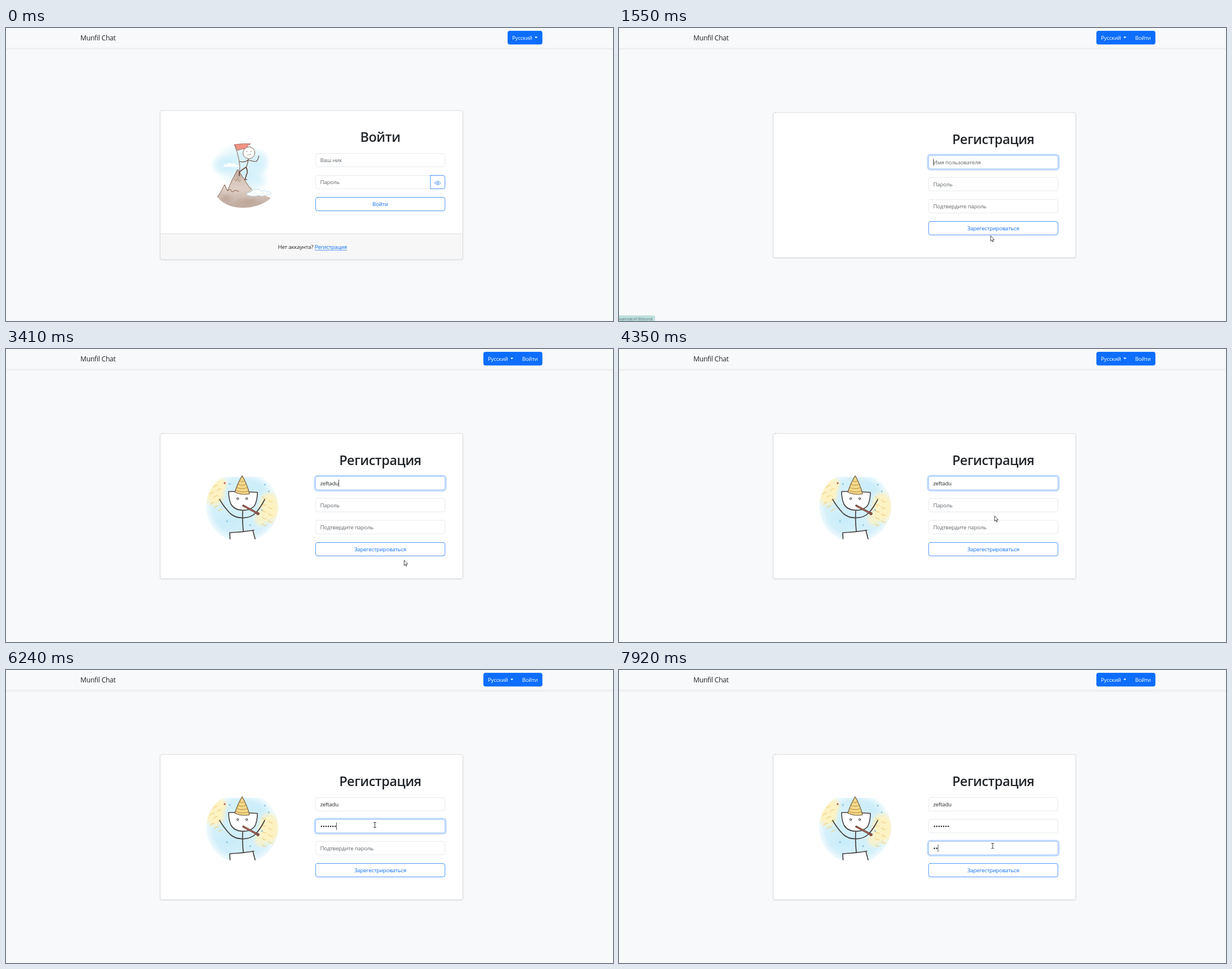
An HTML page with a canvas for the animation above (8000 ms loop, 1077 by 520 pixels).

```html
<!DOCTYPE html>
<html lang="ru">
<head>
<meta charset="utf-8">
<title>Munfil Chat</title>
<style>
html, body { margin: 0; width: 100%; height: 100%; overflow: hidden; background: #f8f9fa; }
canvas { display: block; width: 1077px; height: 520px; }
</style>
</head>
<body>
<canvas id="stage"></canvas>
<script>
const W = 1077, H = 520, LOOP = 8000;
const BLUE = '#0d6efd', INK = '#212529', HINT = '#616569', LINE = '#dee2e6';
const canvas = document.getElementById('stage');
const ratio = window.devicePixelRatio || 1;
canvas.width = W * ratio;
canvas.height = H * ratio;
const c = canvas.getContext('2d');

const BURSTS = [[190, 870], [1070, 1820], [1880, 1880], [3940, 4700], [6840, 6840], [7040, 7180]];
const STEP = 68;
const PATH = [
  [190, 1013, 497], [330, 900, 470], [470, 775, 441], [600, 674, 415], [740, 592, 396], [870, 566.5, 389],
  [1206, 566.5, 389], [1350, 596, 381], [1547, 659.5, 369], [1680, 690, 372], [1818, 705, 375], [1880, 706, 375],
  [3940, 706, 375], [4008, 705, 372], [4076, 700, 361], [4144, 690, 346], [4212, 680, 325],
  [4348, 666, 296.5], [4484, 658, 281], [4552, 655, 276], [4688, 654.5, 275], [6839, 654.5, 275], [6840, 663, 312]
];
const PAGE = 1206, IMAGE = 1615;
const LOGIN = 'zeftadu';
const FIELDS = [
  { y: 226, hint: 'Имя пользователя', on: 1206, off: 4552, caret: 1230, keys: [2420, 2490, 2690, 2890, 3020, 3150, 3410] },
  { y: 265, hint: 'Пароль', on: 4552, off: 7040, caret: 4580, keys: [5370, 5470, 5570, 5770, 5840, 6040, 6240], secret: true },
  { y: 304, hint: 'Подтвердите пароль', on: 7040, off: LOOP, caret: 7050, keys: [7850, 7920], secret: true }
];

const clamp = v => Math.max(0, Math.min(1, v));
const mix = (a, b, k) => a + (b - a) * k;
const ease = k => k * k * (3 - 2 * k);
const ramp = (t, start, span = 140) => ease(clamp((t - start) / span));
const blend = (a, b, k) => `rgb(${a.map((v, i) => Math.round(mix(v, b[i], k)))})`;

function hold(t) {
  let held = 0;
  for (const [start, end] of BURSTS)
    if (t >= start) held = Math.min(end, start + STEP * Math.floor((t - start) / STEP));
  return held;
}

function pointer(t) {
  let i = 0;
  while (i < PATH.length - 1 && PATH[i + 1][0] <= t) i++;
  const a = PATH[i], b = PATH[i + 1] || a;
  const k = b === a ? 0 : (t - a[0]) / (b[0] - a[0]);
  return { x: mix(a[1], b[1], k), y: mix(a[2], b[2], k) };
}

function text(str, x, y, { size = 9.65, color = INK, align = 'left', weight = 400 } = {}) {
  c.font = `${weight} ${size}px "Open Sans", "Noto Sans", sans-serif`;
  c.letterSpacing = `${-0.019 * size}px`;
  c.textAlign = align;
  c.fillStyle = color;
  c.fillText(str, x, y);
  return c.measureText(str).width;
}

function box(x, y, w, h, fill, stroke, r = 3.8, width = 0.75) {
  c.beginPath();
  c.roundRect(x, y, w, h, r);
  if (fill) { c.fillStyle = fill; c.fill(); }
  if (stroke) { c.strokeStyle = stroke; c.lineWidth = width; c.stroke(); }
}

function shadowed(draw) {
  c.save();
  c.shadowColor = 'rgba(0,0,0,.07)';
  c.shadowBlur = 2.6 * ratio;
  c.shadowOffsetY = 1.3 * ratio;
  draw();
  c.restore();
}

function path(d, stroke, width = 1, fill) {
  const p = new Path2D(d);
  if (fill) { c.fillStyle = fill; c.fill(p); }
  if (stroke) { c.strokeStyle = stroke; c.lineWidth = width; c.stroke(p); }
}

function disc(x, y, r, fill, stroke, width = 1) {
  c.beginPath();
  c.arc(x, y, r, 0, 7);
  if (fill) { c.fillStyle = fill; c.fill(); }
  if (stroke) { c.strokeStyle = stroke; c.lineWidth = width; c.stroke(); }
}

// Soft watercolour spot
function wash(x, y, rx, ry, rgb, alpha = 1, core = 0.4) {
  c.save();
  c.translate(x, y);
  c.scale(rx, ry);
  const g = c.createRadialGradient(0, 0, 0, 0, 0, 1);
  g.addColorStop(0, `rgba(${rgb},${alpha})`);
  g.addColorStop(core, `rgba(${rgb},${alpha})`);
  g.addColorStop(1, `rgba(${rgb},0)`);
  disc(0, 0, 1, g);
  c.restore();
}

function climber() {
  const brown = '#84604f', sky = '196,235,249';
  wash(416, 242, 50, 40, sky, 0.65);
  wash(386, 243, 24, 20, sky, 0.55);
  wash(450, 238, 20, 25, sky, 0.5);
  wash(438, 270, 30, 22, sky, 0.55);
  path('M386 245Q386 241 391 242Q396 237 400 241Q406 239 408 243Q414 243 413 246.5H386Z', null, 0, '#fff');

  const rock = c.createLinearGradient(0, 250, 0, 319);
  rock.addColorStop(0, '#cbb5a9');
  rock.addColorStop(0.5, '#decfc6');
  rock.addColorStop(1, '#bfa99d');
  path('M375 300L381 291L388 278L393 289L401 270L411 251L421 266L430 280L440 288L470 302Q450 319 420 319Q391 319 375 300Z', null, 0, rock);
  wash(412, 262, 7, 12, '160,128,112', 0.3, 0.1);
  wash(390, 302, 15, 10, '160,128,112', 0.3, 0.1);
  wash(430, 308, 26, 9, '165,135,118', 0.3, 0.1);
  path('M375 300L381 291L388 278L393 289L401 270L411 251L421 266L430 280L435 286M393 289L398 286L401 291L407 288L413 290', brown, 1);
  path('M405 267L408 272L411 267L414 273L417 270', '#9b7c6b', 0.7);

  path('M427 296Q428 291 434 292Q437 285 444 287Q449 284 453 290Q460 287 463 291Q470 289 470 294Q466 296 460 296Q456 300 449 297Q438 300 427 296Z', '#b4dfef', 0.9, '#fff');
  path('M437 295Q440 290 445 294M452 294Q456 291 459 294', '#c4e5f2', 0.8);

  path('M405.5 207Q420 204.5 434 205.5Q426 209 427.5 214Q419 214 411 217Z', '#8c4c40', 0.7, '#f29385');
  path('M405.5 207Q411 220 414 237Q416 247 414 258', brown, 1);

  disc(431, 221.5, 10.5, '#fff', brown, 1);
  disc(427.5, 219, 0.8, brown);
  disc(434.8, 219, 0.8, brown);
  path('M428 224.5Q431 226.5 434.5 224', brown, 0.6);
  path('M430 233Q429 241 426 248M430 234Q424 239 414 237M430 234Q437 237 444 237Q448 233 448.5 227', '#6a493b', 1.2);
  path('M426 247Q419 251 414 256L414 262M426 247Q430 255 426.5 261L424 269L427 269', '#6a493b', 1.7);
}

function party() {
  const ink = '#454040', sun = '253,242,196';
  c.save();
  c.beginPath();
  c.ellipse(419, 280, 64, 63, 0, 0, 7);
  c.clip();
  c.beginPath();
  c.rect(355, 227, 128, 110);
  c.clip();
  wash(419, 281, 70, 68, '209,239,250', 0.95, 0.74);
  wash(400, 305, 34, 22, '180,228,246', 0.3, 0.1);
  wash(444, 245, 26, 16, '180,228,246', 0.25, 0.1);
  wash(370, 252, 22, 31, sun, 1, 0.6);
  wash(382, 240, 14, 14, sun, 0.9, 0.4);
  wash(467, 281, 22, 32, sun, 1, 0.6);
  wash(452, 301, 15, 17, sun, 0.8, 0.4);
  for (let i = 0; i < 9; i++) {
    const lx = 361 + (i * 7) % 20, ly = 240 + i * 6;
    const rx = 455 + (i * 11) % 22, ry = 262 + i * 6;
    path(`M${lx} ${ly}q2 -4 7 -4M${rx} ${ry}q2 4 7 3`, '#f0cb74', 1.1);
  }
  c.restore();

  for (const [x, y] of [[459, 241], [466, 253], [392, 306], [454, 286], [397, 240], [433, 313]])
    path(`M${x - 2} ${y - 1}l4 -.8l-1.4 3.6z`, null, 0, '#7cc1e2');
  disc(388, 238, 1.7, '#b46555');

  path('M397 326L440 322L442 338H399Z', null, 0, '#fff');
  path('M395 253Q420 252 446 254.5Q446 269 441 278Q433 287 420 286Q405 286 399 275Q395 266 395 253Z', ink, 1.6, '#fff');
  path('M419 225Q411 238 406 254Q419 260 432 257Q428 240 419 225Z', '#67523b', 1.2, '#f5d988');
  path('M415 234Q419 237 423 234M412 240Q419 244 426 240M410 246Q419 250 428 246M408 251Q419 256 430 252', '#a98241', 0.9);
  for (const x of [411, 427]) {
    disc(x, 265.5, 1.9, '#fff', ink, 0.9);
    disc(x + 0.3, 265.8, 0.8, ink);
  }
  path('M379 267Q388 282 398 292Q407 300 420 299.5Q434 300 443 291Q452 281 459 267', ink, 1.7);
  path('M420 287Q419 303 421 323M397 326Q420 325 440 321.5M397 326L397.5 337M438 322L442 337', ink, 1.7);
  path('M421 278L447 292', '#54362f', 3.4);
  path('M422 278.5L446 291.5', '#b5695a', 1.9);
  disc(447, 292.2, 2.3, '#a45749', '#54362f', 0.9);
}

function navbar(second) {
  shadowed(() => { c.fillStyle = '#f8f9fa'; c.fillRect(-10, -10, W + 20, 45.6); });
  text('Munfil Chat', 132, 21.6, { size: 12.1 });
  const x = second ? 847 : 890;
  box(x, 5, 951.7 - x, 24.3, BLUE);
  text('Русский', x + 8, 21, { color: '#fff' });
  path(`M${x + 47.8} 15.6h5.4l-2.7 2.7z`, null, 0, '#fff');
  if (second) text('Войти', 943.5, 21, { color: '#fff', align: 'right' });
}

function card(y, h) {
  shadowed(() => box(273.5, y, 537, h, '#fff'));
  box(273.5, y, 537, h, null, 'rgba(0,0,0,.175)');
}

function title(str, y) {
  text(str, 664, y, { size: 23.4, weight: 600, align: 'center' });
}

function outlineButton(y, label, hover = 0) {
  box(549.3, y, 229.6, 23.8, `rgba(13,110,253,${hover})`, BLUE);
  text(label, 664, y + 15.8, { align: 'center', color: blend([13, 110, 253], [255, 255, 255], hover) });
}

function loginPage(linkHover) {
  card(146.6, 264.4);
  c.fillStyle = 'rgba(0,0,0,.03)';
  c.fillRect(274, 365, 536, 45.6);
  c.fillStyle = 'rgba(0,0,0,.15)';
  c.fillRect(274, 364.6, 536, 0.8);
  climber();
  title('Войти', 202);
  box(549.3, 222.6, 229.6, 23.8, '#fff', LINE);
  text('Ваш ник', 557.5, 238.4, { color: HINT });
  box(549.3, 261.6, 204, 23.8, '#fff', LINE, [3.8, 0, 0, 3.8]);
  text('Пароль', 557.5, 277.4, { color: HINT });
  box(753, 261.6, 25.9, 23.8, '#fff', BLUE, [0, 3.8, 3.8, 0]);
  path('M760.9 275Q766 268.4 771.1 275Q766 281.6 760.9 275Z', BLUE, 0.7);
  disc(766, 275, 1.6, null, BLUE, 0.7);
  outlineButton(300.6, 'Войти');
  text('Нет аккаунта?', 545.2, 392.4, { align: 'right' });
  const color = linkHover ? '#0a58ca' : BLUE;
  const width = text('Регистрация', 547.7, 392.4, { color });
  c.fillRect(547.7, 393.8, width, 0.7);
}

function field(f, t, held) {
  const focus = ramp(held, f.on) * (1 - ramp(held, f.off));
  const x = 549.3, y = f.y + 0.2;
  if (focus > 0) box(x - 1.5, y - 1.5, 232.6, 26.8, null, `rgba(13,110,253,${0.25 * focus})`, 5, 2.6);
  box(x, y, 229.6, 23.8, '#fff', blend([222, 226, 230], [134, 183, 254], focus));

  const typed = f.keys.filter(k => k <= t);
  const n = typed.length;
  let end = 557.5;
  if (!n) {
    text(f.hint, end, y + 15.8, { color: HINT });
  } else if (f.secret) {
    for (let i = 0; i < n; i++) disc(559.7 + 4.08 * i, y + 12.3, 1.25, INK);
    end += 4.08 * n;
  } else {
    end += text(LOGIN.slice(0, n), end, y + 15.8);
  }

  const last = n ? typed[n - 1] : f.caret;
  if (t >= f.on && t < f.off && Math.floor(Math.max(0, t - last) / 530) % 2 === 0) {
    c.fillStyle = INK;
    c.fillRect(end, y + 5.6, 0.8, 13);
  }
}

function signupPage(t, held) {
  card(150, 257.8);
  if (t >= IMAGE) party();
  title('Регистрация', 205.6);
  FIELDS.forEach(f => field(f, t, held));
  outlineButton(343.4, 'Зарегестрироваться', ramp(held, 4040) * (1 - ramp(held, 4180)));
}

function statusBar(t, held) {
  if (t < 1070 || t >= 1820) return;
  c.save();
  c.globalAlpha = 1 - 0.15 * clamp((held - 1400) / 147) - 0.85 * clamp((held - 1550) / 260);
  box(-5, 510.6, 68.6, 15, '#b2dcdb', '#a3cdcc', 1.5, 0.5);
  text('ovalnode:4100/enroll', 59.5, 518.6, { size: 6.5, color: '#48605f', align: 'right' });
  c.restore();
}

function cursor(p, kind) {
  c.save();
  c.translate(p.x, p.y);
  if (kind === 'hand') {
    path('M-1.3 .6Q0 -1 1.1 .6V4.6Q2.2 3.8 3 4.9Q4.2 4.3 4.8 5.5Q6 5.2 6.3 6.5V9Q6.2 11 5 12.6H-.6Q-1.8 10.6 -3.6 8.2Q-4.6 6.6 -3.2 6.3Q-2.2 6.6 -1.3 7.6Z', '#222', 0.8, '#fff');
  } else if (kind === 'beam') {
    path('M-2 -4.5H-.5L0 -4L.5 -4.5H2M0 -4V4M-2 4.5H-.5L0 4L.5 4.5H2', '#222', 0.9);
  } else {
    path('M.4 0V9.2L2.4 7.3L3.8 10.6L5.1 10L3.7 6.8H6.5Z', '#222', 0.8, '#fff');
  }
  c.restore();
}

function cursorKind(p, second) {
  const inside = (x, y, w, h) => p.x >= x && p.x <= x + w && p.y >= y && p.y <= y + h;
  if (!second) return inside(547, 383, 59, 13) ? 'hand' : 'arrow';
  if (inside(549, 343, 230, 24)) return 'hand';
  return FIELDS.some(f => inside(549, f.y, 230, 24)) ? 'beam' : 'arrow';
}

function draw(t) {
  const held = hold(t), second = t >= PAGE;
  const p = pointer(held), kind = cursorKind(p, second);
  c.setTransform(ratio, 0, 0, ratio, 0, 0);
  c.lineCap = c.lineJoin = 'round';
  c.fillStyle = '#f8f9fa';
  c.fillRect(0, 0, W, H);
  navbar(second);
  if (second) signupPage(t, held);
  else loginPage(t >= 190 && kind === 'hand');
  statusBar(t, held);
  if (t >= 190) cursor(p, kind);
}

const begun = performance.now();
function tick() {
  draw((performance.now() - begun) % LOOP);
  requestAnimationFrame(tick);
}
tick();
</script>
</body>
</html>
```
